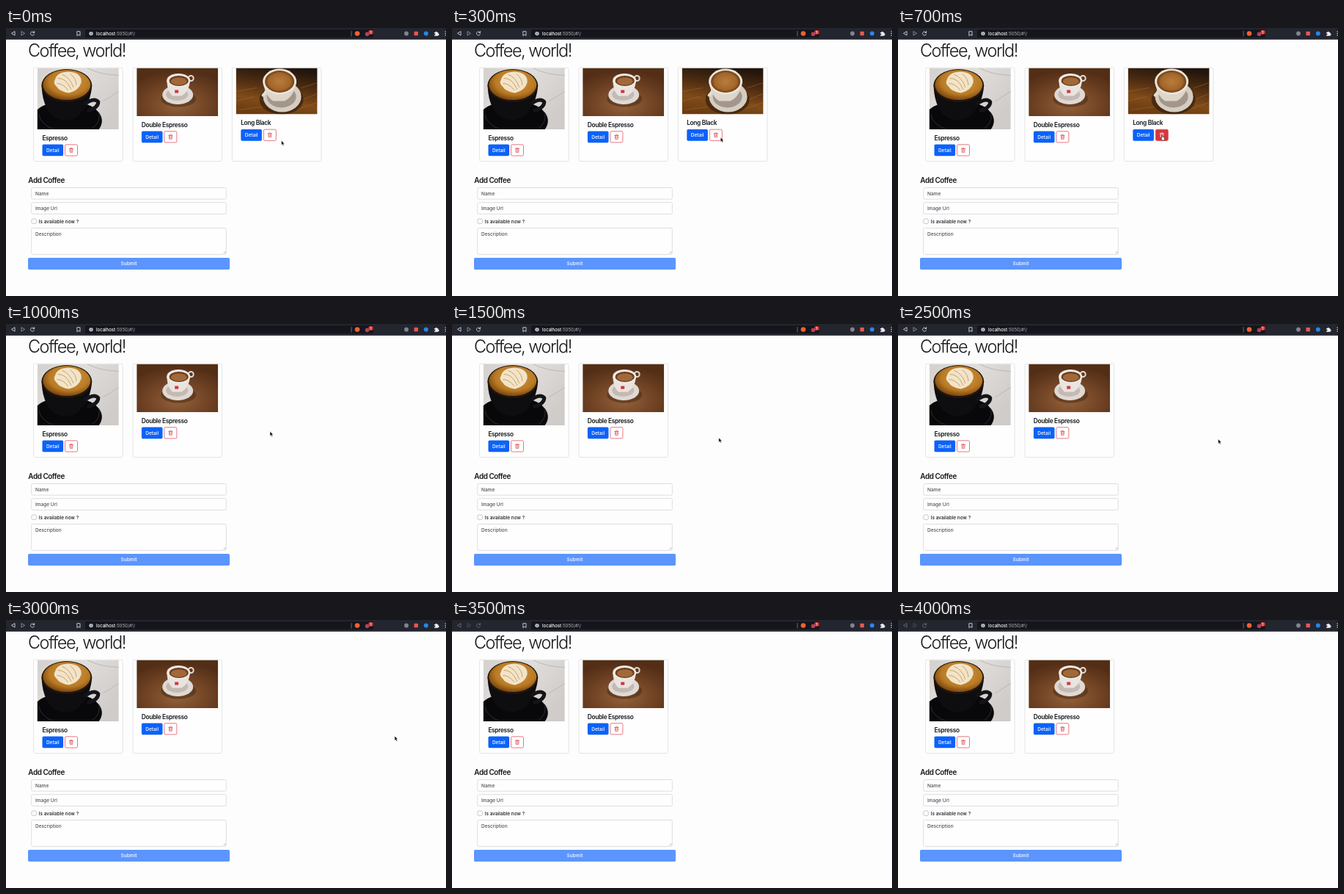
An HTML page that plays this animation: 600x365 px, repeating every 4.1 s.

```html
<!DOCTYPE html>
<html lang="en">
<head>
<meta charset="utf-8">
<title>Coffee</title>
<style>
html, body { margin: 0; width: 100%; height: 100%; overflow: hidden; background: #fdfdfd; }
svg { display: block; }
text { font: 450 6.5px Inter, sans-serif; fill: #15181b; }
.title { font-size: 23.5px; font-weight: 300; letter-spacing: -1.52px; }
.head { font-size: 9.9px; font-weight: 600; letter-spacing: -.43px; }
.name { font-size: 8.3px; font-weight: 600; letter-spacing: -.31px; }
.hint { fill: #4c5156; }
.white { fill: #fff; }
.mid { text-anchor: middle; }
.label { font-weight: 500; }
.box { fill: #fefefe; stroke: #d3d6da; stroke-width: .8; }
.line { fill: none; stroke-linecap: round; stroke-linejoin: round; }
</style>
</head>
<body>
<svg id="stage" width="600" height="365" viewBox="0 0 600 365">
<defs>
  <linearGradient id="marble" x2="1" y2=".6"><stop stop-color="#d3d0cd"/><stop offset=".45" stop-color="#e0ddda"/><stop offset="1" stop-color="#cfccc9"/></linearGradient>
  <radialGradient id="crema" cx=".55" cy=".4" r=".6"><stop stop-color="#d09a45"/><stop offset=".7" stop-color="#b97a24"/><stop offset="1" stop-color="#7c4710"/></radialGradient>
  <radialGradient id="brown" cx=".5" cy=".75" r=".7"><stop stop-color="#94623c"/><stop offset=".5" stop-color="#744626"/><stop offset="1" stop-color="#532e16"/></radialGradient>
  <linearGradient id="wood" x1=".6" x2=".35" y2="1"><stop stop-color="#21150c"/><stop offset=".35" stop-color="#4d2c11"/><stop offset=".7" stop-color="#804b19"/><stop offset="1" stop-color="#6b3c11"/></linearGradient>
  <radialGradient id="coffee"><stop stop-color="#b87d3d"/><stop offset=".75" stop-color="#a3662a"/><stop offset="1" stop-color="#6f3c12"/></radialGradient>
  <g id="trash" class="line" stroke-width=".65">
    <path d="M-2.6-2H2.6M-1-2v-.9H1V-2M-2.1-2l.3 5H1.8l.3-5M-.8-.7v2.5M.8-.7v2.5"/>
  </g>
  <g id="latte">
    <path fill="url(#marble)" d="M0 0h111v84H0z"/>
    <path class="line" stroke="#bcb8b4" d="M68 0Q84 9 111 10M90 45L111 32"/>
    <ellipse cx="40" cy="72" rx="48" ry="28" fill="#08080b"/>
    <path class="line" stroke="#303037" stroke-width=".9" d="M84 62Q87 74 74 83M2 64Q6 78 22 83"/>
    <path fill="#0e0d10" d="M6 28Q8 56 24 67Q40 75 55 66Q71 52 74 28z"/>
    <path class="line" stroke="#141418" stroke-width="5" d="M66 48Q78 40 83 46Q83 54 70 58"/>
    <ellipse cx="40" cy="24" rx="34.500" ry="22.500" fill="#20160c"/>
    <ellipse cx="40" cy="23" rx="32.500" ry="20.500" fill="url(#crema)"/>
    <path fill="#f1e4cb" d="M24 16Q27 5 43 5Q60 6 60 19Q57 31 43 34Q30 32 26 25Q21 21 24 16z"/>
    <path class="line" stroke="#cf9f5c" d="M28 14Q39 13 46 29M34 9Q44 12 49 26M45 8Q53 14 53 23M27 21Q35 21 42 30"/>
  </g>
  <g id="espresso">
    <path fill="url(#brown)" d="M0 0h111v66H0z"/>
    <ellipse cx="57" cy="42" rx="24" ry="11" fill="#452611" opacity=".5"/>
    <ellipse cx="56" cy="36.500" rx="21" ry="13" fill="#dfd9d5"/>
    <ellipse cx="55" cy="36" rx="15" ry="8.500" fill="#c4bab3"/>
    <circle cx="74" cy="14" r="3.500" fill="none" stroke="#e2dbd6" stroke-width="2"/>
    <path fill="#e9e4e0" d="M41 17Q42 33 49 38H61Q71 33 73 17z"/>
    <ellipse cx="57" cy="17" rx="16" ry="9.500" fill="#eee9e5"/>
    <ellipse cx="57.500" cy="17.500" rx="13" ry="7" fill="#6b3b19"/>
    <ellipse cx="57.500" cy="18" rx="11" ry="5.300" fill="#a1683a"/>
    <path fill="#d5373b" d="M52 30h5v4h-5z"/>
  </g>
  <g id="long">
    <path fill="url(#wood)" d="M0 0h111v63H0z"/>
    <path class="line" stroke="#b0722d" opacity=".45" d="M0 32L28 27M0 45L25 39M4 57L42 52M90 27L111 20M91 43L111 35M82 57L111 47"/>
    <ellipse cx="62" cy="43" rx="30" ry="20" fill="#2b180a" opacity=".6"/>
    <ellipse cx="63" cy="39" rx="26" ry="21" fill="#d5cdc1"/>
    <ellipse cx="62" cy="39" rx="20" ry="15" fill="#a3968a"/>
    <path class="line" stroke="#e4ddd3" stroke-width="4" d="M44 30L37 37"/>
    <path fill="#ded6cb" d="M37 20Q41 40 51 45H66Q79 39 82 20z"/>
    <ellipse cx="59.500" cy="18.500" rx="23" ry="17.500" fill="#ebe5da"/>
    <ellipse cx="59.500" cy="18.500" rx="20" ry="15" fill="url(#coffee)"/>
  </g>
</defs>

<path fill="#23252f" d="M0 0h600v15.700H0z"/>
<rect x="108" y="2" width="393" height="11" rx="2" fill="#15161c"/>
<g id="nav" class="line" stroke="#d5d7dc" stroke-width=".9">
  <path d="M12 5v5L7.800 7.500z"/>
  <path d="M21 5v5l4.200-2.500z" opacity=".6"/>
  <path d="M38.300 6a2.600 2.600 0 1 0 .2 2.600M38.700 4.500v2h-2"/>
</g>
<path class="line" stroke="#d5d7dc" stroke-width=".9" d="M97.200 4.700h3.800v5.700l-1.900-1.500-1.900 1.500z"/>
<circle cx="116" cy="7.600" r="2.700" fill="#c3c5ca"/>
<path stroke="#15161c" stroke-width=".7" d="M116 7.200v2M116 5.700v.7"/>
<text x="123" y="9.800" style="font-size:6px" class="white label">localhost<tspan fill="#a0a2a9">:5050/#!/</tspan></text>
<path stroke="#8b8d94" stroke-width=".7" d="M471 4v7.500"/>
<circle cx="479" cy="7.500" r="3.300" fill="#f4602f"/>
<circle cx="492.500" cy="8.200" r="2.800" fill="#b4405d"/>
<rect x="494.500" y="3" width="6" height="5.600" rx="1.500" fill="#e33b35"/>
<text x="497.500" y="7.500" class="white mid" style="font-size:4.500px">1</text>
<circle cx="546" cy="7.500" r="2.900" fill="#85868d"/>
<rect x="556.500" y="4.800" width="5.400" height="5.400" fill="#e35a50"/>
<circle cx="572.800" cy="7.500" r="3" fill="#2686e8"/>
<path fill="#eceef1" d="M584 6h1.500a1.200 1.200 0 1 1 2.400 0h1.500v1.500a1.200 1.200 0 1 1 0 2.400v.8H584V9.300a1 1 0 1 0 0-1.800z"/>
<path stroke="#d5d7dc" d="M598.500 5h1.500M598.500 7.500h1.500M598.500 10h1.500"/>

<text class="title" x="30" y="38.700">Coffee, world!</text>
<g id="cards"></g>
<text class="head" x="30.300" y="211">Add Coffee</text>
<rect class="box" x="34.700" y="217.500" width="265.600" height="15.600" rx="1.800"/>
<text class="hint" x="40" y="227.700">Name</text>
<rect class="box" x="34.700" y="237.700" width="265.600" height="15.600" rx="1.800"/>
<text class="hint" x="40" y="247.900">Image Url</text>
<rect class="box" x="35" y="260" width="6.300" height="6.300" rx="1.400" style="stroke:#b5b9be"/>
<text x="44.700" y="265.500">Is available now ?</text>
<rect class="box" x="34.700" y="272.500" width="265.600" height="35.800" rx="1.800"/>
<text class="hint" x="40" y="282.800">Description</text>
<path stroke="#85888c" stroke-width=".5" d="M296.500 307l3-3M298.300 307l1.200-1.200"/>
<rect x="30" y="313" width="275" height="16" rx="1.800" fill="#5b95fd"/>
<text class="white mid label" x="167.500" y="323.300">Submit</text>
<g id="cursor" stroke-width=".5" stroke-linejoin="round">
  <path id="arrow" stroke="#fff" d="M0 0v6.200l1.400-1.300 1 2.300 1.100-.5-1-2.200h1.900z"/>
  <path id="hand" fill="#fff" stroke="#111" stroke-width=".6" d="M-.5 0q.7-.7 1.200 0v2.300l2.200.6q.8.3.7 1.300L3.200 7H.3L-1.800 4.300q.3-.8 1.300 0z"/>
</g>
</svg>
<script>
const $ = id => document.getElementById(id);
const LOOP = 4100, HOVER = 500, REMOVED = 900, BLUR = 3400;
// Pointer stops: time, x, y
const path = [[0, 375.5, 153.3], [500, 360, 146], [900, 360, 146], [1000, 360, 146.3],
  [1900, 366.8, 161.8], [2500, 436.6, 156.8], [3000, 530, 158], [3400, 604, 160], [LOOP, 604, 160]];

function card(x, photo, height, name) {
  const y = 75 + height;
  return `<g id="card-${photo}">
    <rect class="box" x="${x}" y="54.2" width="121.5" height="127.3" rx="1.8" style="stroke:#dfdfdf"/>
    <svg x="${x + 5.2}" y="54.5" width="111" height="${height}"><use href="#${photo}"/></svg>
    <text class="name" x="${x + 11.8}" y="${y - 5.6}">${name}</text>
    <rect x="${x + 11.9}" y="${y}" width="28.6" height="15.8" rx="1.8" fill="#0c62f8"/>
    <text class="white mid label" x="${x + 26.2}" y="${y + 10.2}">Detail</text>
    <g class="remove" fill="#fff" stroke="#dc3f49">
      <rect x="${x + 42.9}" y="${y + .3}" width="17" height="15.2" rx="1.8" stroke="#dc3f49" stroke-width=".7"/>
      <use href="#trash" x="${x + 51.4}" y="${y + 7.9}"/>
    </g></g>`;
}
$('cards').innerHTML = card(37.6, 'latte', 83.5, 'Espresso')
  + card(173, 'espresso', 65.4, 'Double Espresso') + card(308.4, 'long', 62.9, 'Long Black');
const remove = document.querySelector('#card-long .remove');

function show(el, on) { el.style.display = on ? '' : 'none'; }

function draw(now) {
  const t = Math.floor(now % LOOP / 100) * 100;
  const i = path.findIndex(p => p[0] > t);
  const [t0, x0, y0] = path[i - 1], [t1, x1, y1] = path[i];
  const k = (t - t0) / (t1 - t0);
  const hover = t >= HOVER && t < REMOVED;
  $('cursor').setAttribute('transform', `translate(${x0 + (x1 - x0) * k} ${y0 + (y1 - y0) * k})`);
  show($('arrow'), !hover);
  show($('hand'), hover);
  show($('card-long'), t < REMOVED);
  remove.setAttribute('fill', hover ? '#d9343c' : '#fff');
  remove.setAttribute('stroke', hover ? '#fff' : '#dc3f49');
  $('nav').setAttribute('opacity', t < BLUR ? 1 : .4);
  requestAnimationFrame(draw);
}
requestAnimationFrame(draw);
</script>
</body>
</html>
```
